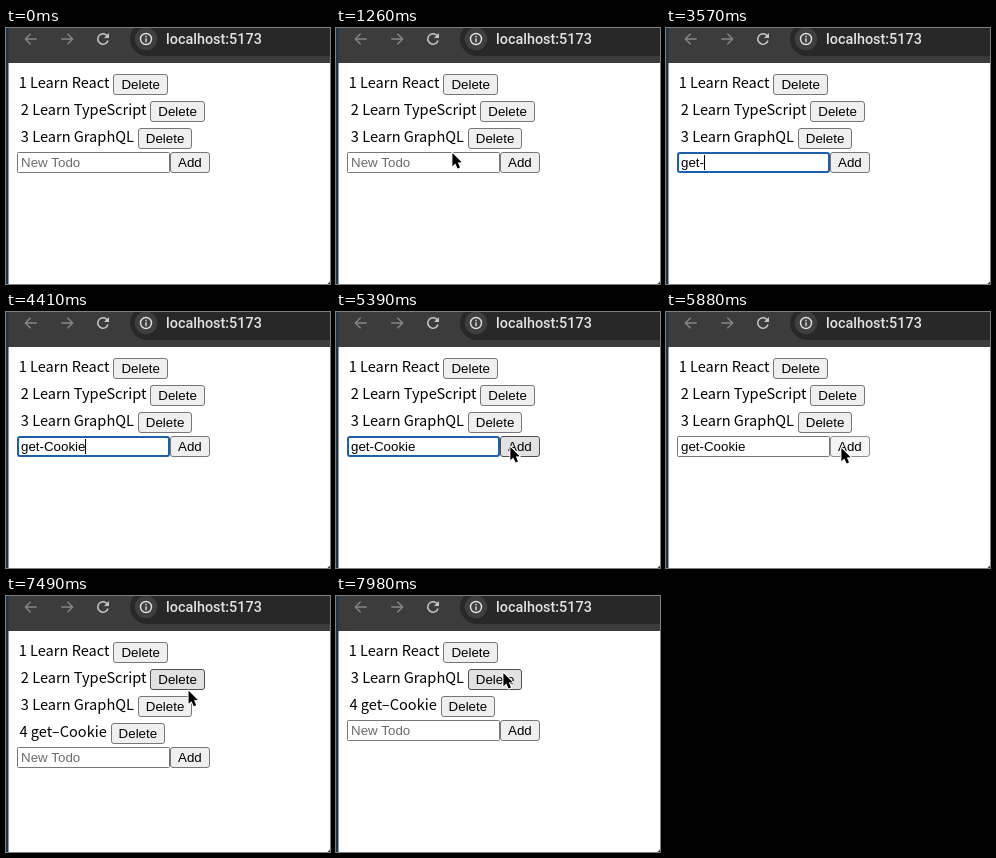
An HTML page with a canvas that plays this animation: 324x256 px, repeating every 8000 ms.

```html
<!DOCTYPE html>
<html lang="en">
<head>
<meta charset="utf-8">
<title>Todo list</title>
<style>
  html, body { margin: 0; width: 100%; height: 100%; overflow: hidden; background: #fff; }
  canvas { display: block; width: 324px; height: 256px; }
</style>
</head>
<body>
<canvas id="stage"></canvas>
<script>
const W = 324, H = 256, LOOP = 8000, TICK = 70;
const UI = '13.333px "Liberation Sans", Arial, sans-serif';
const BODY = '14.6px "Noto Sans CJK KR", "Noto Sans CJK JP", "Noto Sans CJK SC", "Noto Sans", sans-serif';
const BAR = '500 14.4px Roboto, sans-serif';

const canvas = document.getElementById('stage');
const ctx = canvas.getContext('2d');
const scale = window.devicePixelRatio || 1;
canvas.width = W * scale;
canvas.height = H * scale;

// Each row is on the list from `from` until `to`; x is its Delete button.
const ROWS = [
  { text: '1 Learn React', x: 107.4, from: 0, to: LOOP },
  { text: '2 Learn TypeScript', x: 144.3, from: 0, to: 7980 },
  { text: '3 Learn GraphQL', x: 131.8, from: 0, to: LOOP },
  { text: '4 get–Cookie', x: 104.6, from: 6020, to: LOOP }
];

const FOCUS = 1680, BLUR = 5880, SUBMIT = 6020, PRESS = 7840;
const WORD = 'get-Cookie';
const KEYS = [[1960, 1], [2100, 2], [2240, 3], [3570, 4], [3780, 5],
  [3850, 6], [4060, 7], [4200, 8], [4410, 10]];
const CARET_OFF = [[2730, 3290], [4830, 5460]];

// Pointer strokes: points evenly spaced in time, held after the end.
const STROKES = [
  { from: 350, to: 840, pts: [[140, 246], [131, 190], [120, 146], [113, 128], [115, 125]] },
  { from: 980, to: 980, pts: [[116, 124]] },
  { from: 1400, to: 1400, pts: [[116, 119]] },
  { from: 1470, to: 1470, pts: [[115, 125]] },
  { from: 1960, to: 1960, pts: null },
  { from: 4830, to: 5530, pts: [[115, 125], [118, 117], [145, 124], [170, 140], [174, 134], [174, 134]] },
  { from: 5600, to: 5600, pts: [[175, 135]] },
  { from: 6580, to: 7700, pts: [[177, 140], [192, 160], [218, 162], [237, 147], [235, 128],
    [212, 118], [192, 104], [174, 84], [167, 76]] }
];

const within = (t, a, b) => t >= a && t < b;

function spline(pts, u) {
  const last = pts.length - 1;
  const i = Math.min(Math.floor(u * last), Math.max(last - 1, 0));
  const f = u * last - i;
  const at = k => pts[Math.max(0, Math.min(last, k))];
  const [a, b, c, d] = [at(i - 1), at(i), at(i + 1), at(i + 2)];
  return [0, 1].map(n => b[n] + f / 2 * (c[n] - a[n] +
    f * (2 * a[n] - 5 * b[n] + 4 * c[n] - d[n] + f * (3 * (b[n] - c[n]) + d[n] - a[n]))));
}

function pointerAt(t) {
  const s = STROKES.filter(k => t >= k.from).pop();
  if (!s || !s.pts) return null;
  const u = s.to > s.from ? Math.min(1, (t - s.from) / (s.to - s.from)) : 0;
  return spline(s.pts, u);
}

function label(text, x, y, font, color, align = 'left') {
  ctx.font = font;
  ctx.fillStyle = color;
  ctx.textAlign = align;
  ctx.fillText(text, x, y);
}

function box(x, y, w, h, r, fill, stroke, line) {
  ctx.beginPath();
  ctx.roundRect(x + line / 2, y + line / 2, w - line, h - line, r);
  ctx.fillStyle = fill;
  ctx.fill();
  ctx.strokeStyle = stroke;
  ctx.lineWidth = line;
  ctx.stroke();
}

function disc(x, y, r, color) {
  ctx.beginPath();
  ctx.arc(x, y, r, 0, Math.PI * 2);
  ctx.fillStyle = color;
  ctx.fill();
}

// Edges snap to whole pixels, as a browser does with borders.
function button(text, x, y, w, pointer, pressed) {
  const left = Math.round(x), right = Math.round(x + w);
  const over = pointer && within(pointer[0], left, right) && within(pointer[1], y, y + 21);
  let fill = '#efefef', edge = '#767676';
  if (over) [fill, edge] = pressed ? ['#f5f5f5', '#8d8d8d'] : ['#e2e2e2', '#4f4f4f'];
  box(left, y, right - left, 21, 2.5, fill, edge, 1);
  label(text, x + 8, y + 15, UI, '#000');
}

function arrow(cx, dir) {
  ctx.beginPath();
  ctx.moveTo(cx - dir * 5.7, 11);
  ctx.lineTo(cx + dir * 5.7, 11);
  ctx.moveTo(cx + dir * 0.4, 5.7);
  ctx.lineTo(cx + dir * 5.7, 11);
  ctx.lineTo(cx + dir * 0.4, 16.3);
  ctx.strokeStyle = '#868686';
  ctx.lineWidth = 1.4;
  ctx.stroke();
}

function browser() {
  ctx.fillStyle = '#fff';
  ctx.fillRect(0, 0, W, H);
  ctx.fillStyle = '#3c3c3c';
  ctx.fillRect(0, 0, W, 35);
  ctx.fillStyle = '#203343';
  ctx.fillRect(0, 0, 2.5, H);
  ctx.beginPath();
  ctx.roundRect(124, -6, 240, 34, 17);
  ctx.fillStyle = '#282828';
  ctx.fill();

  arrow(25, -1);
  arrow(61, 1);

  // Reload
  ctx.beginPath();
  ctx.arc(97, 11, 5.2, 0.3, Math.PI * 1.78);
  ctx.strokeStyle = '#c7c7c7';
  ctx.lineWidth = 1.5;
  ctx.stroke();
  ctx.beginPath();
  ctx.moveTo(103, 5);
  ctx.lineTo(103, 10);
  ctx.lineTo(98, 10);
  ctx.fillStyle = '#c7c7c7';
  ctx.fill();

  // Site information
  disc(140, 11, 11.3, '#3f3f3f');
  ctx.beginPath();
  ctx.arc(140, 11, 5.5, 0, Math.PI * 2);
  ctx.strokeStyle = '#e3e3e3';
  ctx.lineWidth = 1.4;
  ctx.stroke();
  ctx.fillStyle = '#e3e3e3';
  ctx.fillRect(139.3, 10.3, 1.4, 3.8);
  ctx.fillRect(139.3, 7.8, 1.4, 1.5);

  label('localhost:5173', 160, 16, BAR, '#e3e3e3');

  // Window corner
  ctx.beginPath();
  ctx.moveTo(W, H - 2.5);
  ctx.lineTo(W, H);
  ctx.lineTo(W - 2.5, H);
  ctx.fillStyle = '#333';
  ctx.fill();
}

function field(t, y) {
  const focused = within(t, FOCUS, BLUR);
  if (focused) box(11, y, 153, 21, 2, '#fff', '#1c60ac', 2);
  else box(11, y, 153, 21, 1, '#fff', '#767676', 1);

  const key = KEYS.filter(k => t >= k[0]).pop();
  const typed = key && t < SUBMIT ? WORD.slice(0, key[1]) : '';
  if (typed) label(typed, 15, y + 15, UI, '#000');
  else label('New Todo', 15, y + 15, UI, '#6c6c6c');

  if (focused && !CARET_OFF.some(([a, b]) => within(t, a, b))) {
    ctx.font = UI;
    ctx.fillStyle = '#000';
    ctx.fillRect(Math.round(14.6 + ctx.measureText(typed).width), y + 3, 1, 15);
  }
}

function cursor([x, y]) {
  const shape = [[0, 0], [0, 13.2], [2.9, 10.5], [5.2, 15.6], [7.6, 14.5], [5.4, 9.6], [9.3, 9.3]];
  ctx.beginPath();
  for (const [dx, dy] of shape) ctx.lineTo(x + dx + 0.4, y + dy + 1);
  ctx.closePath();
  ctx.lineJoin = 'round';
  ctx.strokeStyle = '#fff';
  ctx.lineWidth = 2;
  ctx.stroke();
  ctx.lineJoin = 'miter';
  ctx.fillStyle = '#000';
  ctx.fill();
}

function draw(now) {
  const t = Math.floor((now % LOOP) / TICK) * TICK;
  const pointer = pointerAt(t);
  const rows = ROWS.filter(r => within(t, r.from, r.to));
  const fieldY = 43 + rows.length * 27;

  ctx.setTransform(scale, 0, 0, scale, 0, 0);
  browser();
  rows.forEach((row, i) => {
    const y = 46 + i * 27;
    label(row.text, row.x - 3.8, y + 14, BODY, '#000', 'right');
    button('Delete', row.x, y, 54.5, pointer, within(t, PRESS, 7980));
  });
  field(t, fieldY);
  button('Add', 164, fieldY, 40, pointer, within(t, BLUR, SUBMIT));
  if (pointer) cursor(pointer);
}

const start = performance.now();
function loop() {
  draw(performance.now() - start);
  requestAnimationFrame(loop);
}
loop();
</script>
</body>
</html>
```
